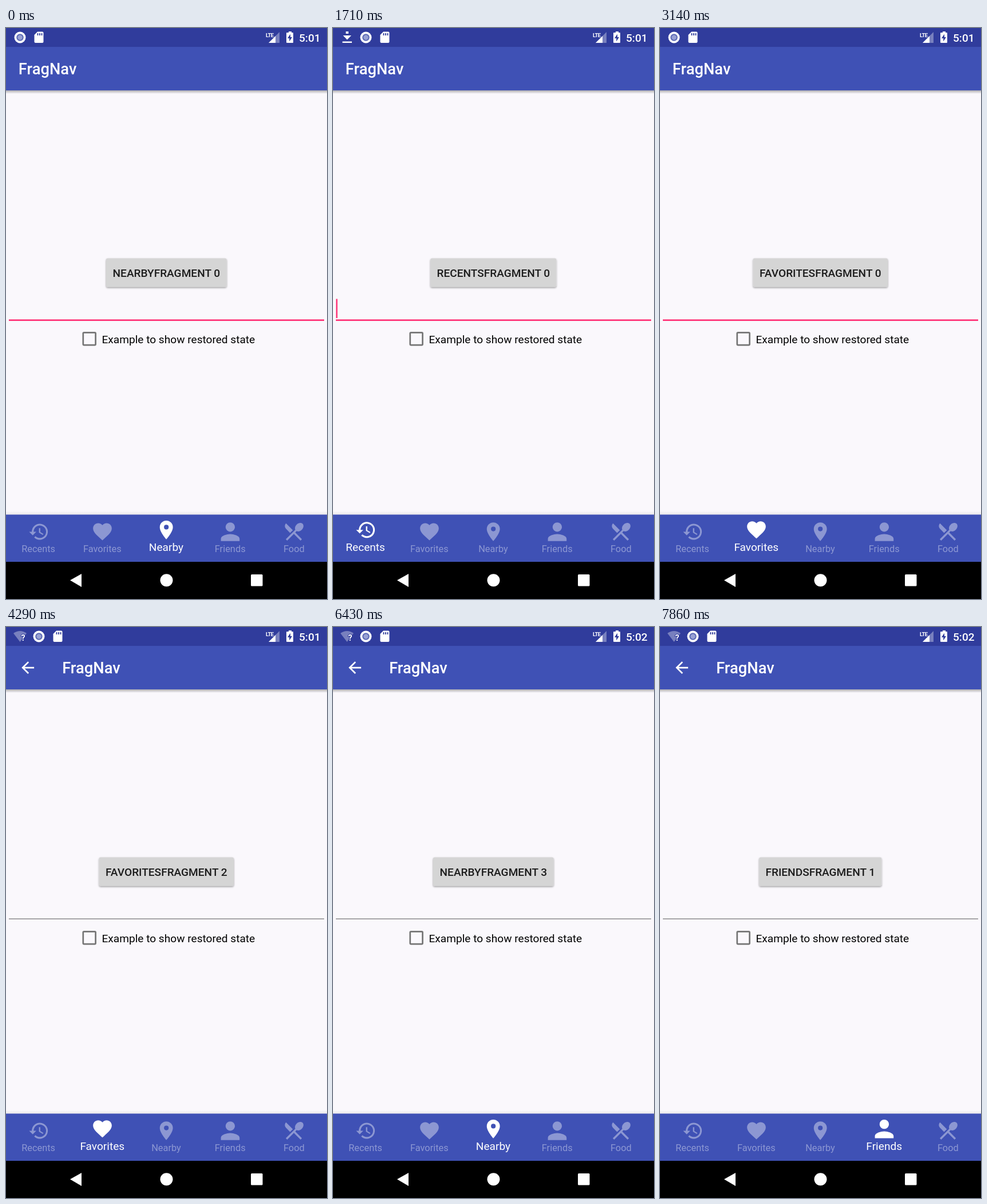
These frames come from a looping animation (561 px wide and 998 px high, 8000 ms). An HTML page:

```html
<!DOCTYPE html>
<html lang="en">
<head>
<meta charset="utf-8">
<title>FragNav</title>
<style>
html, body { margin: 0; width: 100%; height: 100%; overflow: hidden; background: #faf8fc; }
svg { display: block; width: 561px; height: 998px; font-family: Roboto, sans-serif; }
</style>
</head>
<body>
<svg id="stage" viewBox="0 0 561 998">
  <defs>
    <linearGradient id="below" x2="0" y2="1">
      <stop stop-opacity=".3"/><stop offset="1" stop-opacity="0"/>
    </linearGradient>
    <linearGradient id="above" x2="0" y2="1">
      <stop stop-opacity="0"/><stop offset="1" stop-opacity=".07"/>
    </linearGradient>
    <filter id="lift" x="-10%" y="-30%" width="120%" height="170%">
      <feDropShadow dx="0" dy="1.6" stdDeviation="1.4" flood-opacity=".4"/>
    </filter>
    <clipPath id="bar"><rect y="850.5" width="561" height="82.5"/></clipPath>
  </defs>
  <rect width="561" height="998" fill="#faf8fc"/>
  <rect y="109" width="561" height="6" fill="url(#below)"/>
  <rect y="844.5" width="561" height="6" fill="url(#above)"/>
  <rect y="33" width="561" height="76" fill="#3f51b5"/>
  <rect width="561" height="33" fill="#303c9c"/>
  <rect y="850.5" width="561" height="83" fill="#3f51b5"/>
  <rect y="933" width="561" height="65"/>
  <g fill="#fff">
    <path d="M112 965.3 132 954V977z"/>
    <circle cx="280.5" cy="965.3" r="11"/>
    <rect x="428" y="955" width="20.5" height="20.5" rx="1.5"/>
    <text x="454" y="16" font-size="9.5" font-weight="700" letter-spacing="-.7">LTE</text>
    <path d="M459 26H478V7z" opacity=".35"/>
    <path d="M459 26H471V14z"/>
    <path d="M490 9a1 1 0 0 1 1-1h3V6h5v2h2a1 1 0 0 1 1 1V25a1 1 0 0 1-1 1H491a1 1 0 0 1-1-1z"/>
    <path d="M497 10.5 492 18h3.2v5.500L500 16h-3z" fill="#303c9c"/>
  </g>
  <rect x="134.800" y="532.300" width="21.800" height="21.800" rx="1.500" fill="none" stroke="#757575" stroke-width="2.700"/>
  <text x="167.500" y="550.500" font-size="19.100">Example to show restored state</text>
  <g id="live"></g>
</svg>
<script>
const TICKS = 56, PERIOD = 8000, PINK = '#ff3377';

// name, icon path, icon centre, icon scale, half width of the tab's button
const tabs = [
  ['Recents', 'M13 3a9 9 0 0 0-9 9H1l3.890 3.890.07.14L9 12H6a7 7 0 1 1 2.060 4.940l-1.420 1.420A9 9 0 1 0 13 3zm-1 5v5l4.280 2.540.72-1.210-3.500-2.080V8z', 11.5, 12, 1.557, 110],
  ['Favorites', 'M12 21.350l-1.450-1.320C5.400 15.360 2 12.280 2 8.500 2 5.420 4.420 3 7.500 3c1.740 0 3.410.81 4.500 2.090C13.090 3.810 14.760 3 16.500 3 19.580 3 22 5.420 22 8.500c0 3.780-3.400 6.860-8.550 11.540z', 12, 12.17, 1.635, 117.7],
  ['Nearby', 'M12 2a7 7 0 0 0-7 7c0 5.250 7 13 7 13s7-7.750 7-13a7 7 0 0 0-7-7zm0 9.500a2.500 2.500 0 1 1 0-5 2.500 2.500 0 0 1 0 5z', 12, 12, 1.635, 105.3],
  ['Friends', 'M12 12a4 4 0 1 0 0-8 4 4 0 0 0 0 8zm0 2c-2.670 0-8 1.340-8 4v2h16v-2c0-2.660-5.330-4-8-4z', 12, 12, 2.04, 107],
  ['Food', 'M8.100 13.340l2.830-2.830L3.910 3.500a4 4 0 0 0 0 5.660zm6.780-1.810c1.530.71 3.680.21 5.270-1.380 1.910-1.910 2.280-4.650.81-6.120-1.460-1.460-4.200-1.100-6.120.81-1.590 1.590-2.090 3.740-1.380 5.270L3.700 19.870l1.410 1.410L12 14.410l6.880 6.880 1.410-1.410L13.410 13z', 12.3, 12.2, 1.7, 100]
];

// start tick, tab, depth of the fragment stack
const screens = [[0, 2, 0], [5, 0, 0], [17, 1, 0], [23, 1, 1], [30, 1, 2], [35, 2, 0],
  [40, 2, 1], [42, 2, 2], [44, 2, 3], [50, 3, 0], [54, 3, 1]];
const switches = [[5, 2, 0], [17, 0, 1], [35, 1, 2], [50, 2, 3]]; // tick, from, to
const cursorOn = [[1, 3], [5, 8], [12, 15], [17, 21], [35, 39], [50, 54]];
const pressed = [23, 24, 40, 41, 44, 54];
const ripples = [[37, .07], [65, .045], [65, .02]]; // radius, opacity

const mix = (a, b, k) => a + (b - a) * k;
const tabX = i => 280.2 + (i - 2) * 111.7;
const within = (n, spans) => spans.some(([a, b]) => n >= a && n < b);

function statusIcons(n) {
  const half = n === 8 || n === 20 || n === 23;
  const shown = half ? .5 : within(n, [[9, 20], [24, TICKS]]) ? 1 : 0;
  const first = n < 22
    ? `<path d="M22.500 6h4.500v7h5L24.700 20.500 17.500 13h5zM16.500 23.500h16.500v2.500h-16.500z"/>
       ${n < 13 ? '<path d="M22 10h6v3h-6z" fill="#303c9c"/>' : ''}`
    : `<path d="M13 11q11.500-8 23 0L24.500 26z" opacity=".35"/>
       <text x="26.500" y="24" font-size="14" font-weight="700" stroke="#303c9c" stroke-width="2" paint-order="stroke">?</text>`;
  return `<g fill="#fff"><g opacity="${shown ** 3}">${first}</g>
    <g transform="translate(${shown * 33})">
      <circle cx="24.500" cy="16.500" r="10"/>
      <circle cx="24.500" cy="16.500" r="6.200" fill="#5a68b4"/>
      <circle cx="24.500" cy="16.500" r="4.200" fill="#98a1d4"/>
      <path d="M55 6.500h8.500a2 2 0 0 1 2 2V24a2 2 0 0 1-2 2h-12a2 2 0 0 1-2-2V12z"/>
      <path d="M55.500 9v4m3.500-4v4m3.500-4v4" stroke="#303c9c" stroke-width="1.800"/>
    </g></g>
    <text x="512" y="23.700" fill="#fff" font-size="19.100" font-weight="500">${n < 32 ? '5:01' : '5:02'}</text>`;
}

function toolbar(depth) {
  const arrow = '<path transform="translate(21.800 54.700) scale(1.365)" d="M20 11H7.830l5.590-5.590L12 4l-8 8 8 8 1.410-1.410L7.830 13H20z"/>';
  return `<g fill="#fff">${depth ? arrow : ''}
    <text x="${depth ? 98.2 : 21.8}" y="81.300" font-size="27.300" font-weight="500">FragNav</text></g>`;
}

function content(n, tab, depth) {
  const [name, , , , , half] = tabs[tab];
  const line = depth
    ? '<rect x="5" y="509.500" width="551" height="1.300" fill="#7b7a7c"/>'
    : `<rect x="5" y="509.300" width="551" height="2.700" fill="${PINK}"/>`;
  const cursor = !depth && within(n, cursorOn)
    ? `<rect x="5.300" y="473.500" width="2.500" height="33.500" fill="${PINK}"/>` : '';
  return `<rect x="${280.3 - half}" y="402.500" width="${half * 2}" height="50" rx="2.700"
      fill="${pressed.includes(n) ? '#c9c9c9' : '#d5d5d5'}" filter="url(#lift)"/>
    <text x="280.300" y="434.700" text-anchor="middle" font-size="19.100" font-weight="500"
      fill="#1c1c1c">${name.toUpperCase()}FRAGMENT ${depth}</text>${line}${cursor}`;
}

function bottomBar(n, tab) {
  const change = switches.find(([start]) => start === n);
  const recent = switches.find(([start]) => n >= start && n < start + ripples.length);
  let out = '';
  if (recent) {
    const [r, alpha] = ripples[n - recent[0]];
    out = `<circle cx="${tabX(recent[2]) - (r < 40 ? 2.5 : -1)}" cy="889" r="${r}" opacity="${alpha}" clip-path="url(#bar)"/>`;
  }
  tabs.forEach(([name, path, cx, cy, scale], i) => {
    let k = i === tab ? 1 : 0;
    if (change) k = i === change[2] ? .15 : i === change[1] ? .85 : 0;
    const x = tabX(i);
    out += `<g fill="#fff" opacity="${mix(.4, 1, k)}">
      <path transform="translate(${x} ${mix(880.5, 877.3, k)}) scale(${scale}) translate(${-cx} ${-cy})" d="${path}"/>
      <text x="${x - .2}" y="${mix(916.3, 914.3, k)}" text-anchor="middle" font-size="${mix(16.4, 19.1, k)}">${name}</text></g>`;
  });
  return out;
}

const live = document.getElementById('live');
let last = -1;

function frame(now) {
  const n = Math.floor((now % PERIOD + 5) * TICKS / PERIOD) % TICKS;
  if (n !== last) {
    last = n;
    const [, tab, depth] = screens.filter(([start]) => start <= n).pop();
    live.innerHTML = statusIcons(n) + toolbar(depth) + content(n, tab, depth) + bottomBar(n, tab);
  }
  requestAnimationFrame(frame);
}
frame(performance.now());
</script>
</body>
</html>
```
